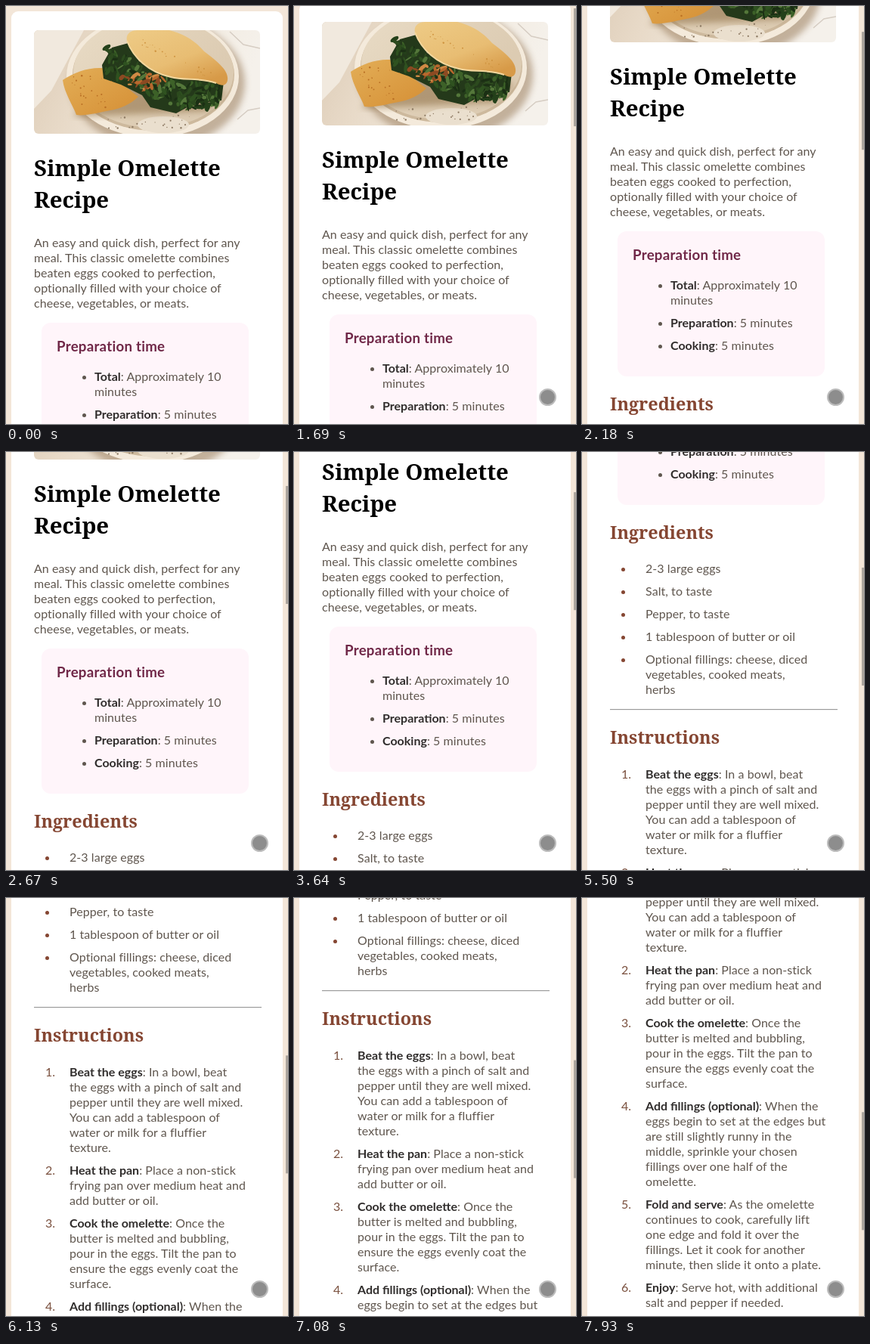
An HTML page for the animation above (7990 ms loop, 373 px wide and 553 px high).

```html
<!DOCTYPE html>
<html lang="en">
<head>
<meta charset="utf-8">
<title>Simple Omelette Recipe</title>
<style>
  html, body { margin: 0; width: 100%; height: 100%; overflow: hidden; background: #f3e6d8; }
  #stage { position: relative; width: 373px; height: 553px; overflow: hidden; }
  #page { position: absolute; left: 0; top: 0; width: 373px; height: 1956px; white-space: nowrap;
    font: 16px/20px Lato, sans-serif; letter-spacing: .06px; color: #5f564e; }
  #page > * { position: absolute; margin: 0; padding: 0; }
  .card { left: 7px; top: 7px; width: 359px; height: 1930px; border-radius: 9px; background: #fff; }
  .photo { left: 37px; top: 32px; border-radius: 6px; }
  h1, h2 { left: 37px; font-family: "Noto Serif", serif; font-weight: 700; letter-spacing: 0; }
  h1 { top: 193px; font-size: 29.4px; line-height: 42px; color: #000; }
  h2 { font-size: 23.4px; line-height: 30px; color: #854632; }
  h3 { left: 67px; top: 438px; font-size: 18.72px; line-height: 24px; letter-spacing: .25px; color: #702848; }
  strong { color: #302d2c; letter-spacing: 0; }
  .intro { left: 37px; top: 303px; }
  .panel { left: 47px; top: 419px; width: 274px; height: 192px; border-radius: 12px; background: #fff5fa; }
  ul, ol { list-style: none; }
  li { position: relative; margin-bottom: 10px; }
  li::before { content: ""; position: absolute; left: -32px; color: #7a503e; }
  ul li::before { top: 9px; width: 5px; height: 5px; border-radius: 50%; background: #854632; }
  .times li::before { left: -16px; background: #5f564e; }
  .times { left: 117px; top: 480px; }
  .items { left: 84px; top: 685px; }
  .steps { left: 84px; top: 957px; counter-reset: step; }
  .steps li::before { counter-increment: step; content: counter(step) "."; }
  .rule { left: 37px; top: 881px; width: 301px; height: 1px; background: #9a9a9a; border-bottom: 1px solid #eee; }
  #thumb { position: absolute; left: 370px; top: 0; width: 3px; height: 156px; background: #aca59e; }
  #touch { position: absolute; left: 324px; top: -12px; width: 19px; height: 19px; border-radius: 50%;
    background: #8d8d8d; border: 2px solid #bcbcbc; }
</style>
</head>
<body>
<div id="stage">
  <div id="page">
    <div class="card"></div>
    <svg class="photo" width="299" height="137" viewBox="37 32 299 137">
      <defs>
        <linearGradient id="marble" y2=".2"><stop offset="0" stop-color="#dccbb6"/><stop offset=".3" stop-color="#e8dac8"/><stop offset=".8" stop-color="#f3ede4"/><stop offset="1" stop-color="#f5f1eb"/></linearGradient>
        <linearGradient id="dish" x2=".8" y2=".6"><stop offset="0" stop-color="#e9dcc6"/><stop offset="1" stop-color="#dccbb2"/></linearGradient>
        <linearGradient id="egg" x2=".7" y2="1"><stop offset="0" stop-color="#eecb86"/><stop offset=".6" stop-color="#e8bd73"/><stop offset="1" stop-color="#d79a48"/></linearGradient>
        <linearGradient id="lobe" y2="1"><stop offset="0" stop-color="#e3ae57"/><stop offset="1" stop-color="#d58f35"/></linearGradient>
        <filter id="soft"><feGaussianBlur stdDeviation="4"/></filter>
      </defs>
      <path fill="url(#marble)" d="M37 32h299v137H37z"/>
      <path fill="#f1e9de" d="M37 32h66L60 112 37 136z"/>
      <path fill="none" stroke="#d6cdc3" stroke-width="1.5" d="M296 34l18 17 22 5M306 150l14-12 16-3"/>
      <ellipse cx="200" cy="102" rx="116" ry="86" fill="#a08566" opacity=".6" filter="url(#soft)"/>
      <ellipse cx="194" cy="93" rx="114" ry="81" fill="#f4eadb"/>
      <ellipse cx="195" cy="91" rx="107" ry="74" fill="#cdb99d"/>
      <ellipse cx="195" cy="88" rx="106" ry="73" fill="url(#dish)"/>
      <ellipse cx="208" cy="157" rx="34" ry="11" fill="#eadfce"/>
      <path fill="#8a6a40" opacity=".55" filter="url(#soft)" d="M88 146l45-1 60-3 72-3 27-24-140-20z"/>
      <path fill="url(#lobe)" d="M75 98c14-10 34-17 52-16l48 38c-10 10-24 16-37 18-16 3-34 8-45 6-4-12-16-29-18-46z"/>
      <path fill="#24391a" d="M127 78l13-23 22-6 14 24 42 20 70 7-3 25-36 4-24 13-34-8-11-16-28-14-23-8z"/>
      <g id="leaves"></g>
      <path fill="url(#egg)" d="M160 46c-2-8 4-14 14-14h42c20 5 34 14 46 28 17 13 33 25 31 38-1 7-7 9-15 4-22-8-42-3-60-8-29-6-50-26-58-48z"/>
      <path fill="none" stroke="#f3d79e" stroke-width="2" d="M160 46c8 22 29 42 58 48 18 5 38 0 60 8"/>
      <g id="specks"></g>
    </svg>
    <h1>Simple Omelette<br>Recipe</h1>
    <p class="intro">An easy and quick dish, perfect for any<br>meal. This classic omelette combines<br>beaten eggs cooked to perfection,<br>optionally filled with your choice of<br>cheese, vegetables, or meats.</p>
    <div class="panel"></div>
    <h3>Preparation time</h3>
    <ul class="times">
      <li><strong>Total</strong>: Approximately 10<br>minutes</li>
      <li><strong>Preparation</strong>: 5 minutes</li>
      <li><strong>Cooking</strong>: 5 minutes</li>
    </ul>
    <h2 style="top:632px">Ingredients</h2>
    <ul class="items">
      <li>2-3 large eggs</li>
      <li>Salt, to taste</li>
      <li>Pepper, to taste</li>
      <li>1 tablespoon of butter or oil</li>
      <li>Optional fillings: cheese, diced<br>vegetables, cooked meats,<br>herbs</li>
    </ul>
    <div class="rule"></div>
    <h2 style="top:903px">Instructions</h2>
    <ol class="steps">
      <li><strong>Beat the eggs</strong>: In a bowl, beat<br>the eggs with a pinch of salt and<br>pepper until they are well mixed.<br>You can add a tablespoon of<br>water or milk for a fluffier<br>texture.</li>
      <li><strong>Heat the pan</strong>: Place a non-stick<br>frying pan over medium heat and<br>add butter or oil.</li>
      <li><strong>Cook the omelette</strong>: Once the<br>butter is melted and bubbling,<br>pour in the eggs. Tilt the pan to<br>ensure the eggs evenly coat the<br>surface.</li>
      <li><strong>Add fillings (optional)</strong>: When the<br>eggs begin to set at the edges but<br>are still slightly runny in the<br>middle, sprinkle your chosen<br>fillings over one half of the<br>omelette.</li>
      <li><strong>Fold and serve</strong>: As the omelette<br>continues to cook, carefully lift<br>one edge and fold it over the<br>fillings. Let it cook for another<br>minute, then slide it onto a plate.</li>
      <li><strong>Enjoy</strong>: Serve hot, with additional<br>salt and pepper if needed.</li>
    </ol>
  </div>
  <div id="thumb"></div>
  <div id="touch"></div>
</div>
<script>
const LOOP = 7990, TICK = 69;
const $ = id => document.getElementById(id);

// Each swipe: first moving tick, scroll range, how far into the easing it begins, easing length.
const swipes = [
  { start: 1690, from: 0, to: 163, lead: 223, span: 1486 },
  { start: 3440, from: 163, to: 454, lead: 35, span: 1443 },
  { start: 5160, from: 454, to: 755, lead: 46, span: 1443 },
  { start: 7010, from: 755, to: 1026, lead: 42, span: 1443 }
];

let seed = 7;
const random = () => (seed = seed * 16807 % 2147483647) / 2147483647;
const pick = list => list[Math.floor(random() * list.length)];

function drawFilling() {
  const greens = ['#2c4a1e', '#3d6128', '#1b2f14', '#54773a', '#2f5220', '#24401a'];
  const browns = ['#b9682d', '#d08a45', '#8c4a22'];
  let leaves = '', specks = '';
  for (let i = 0; i < 200; i++) {
    const u = random(), spread = random() - .5;
    const x = 132 + 150 * u, y = 70 + 50 * Math.sin(u * 1.8) + spread * 34;
    const brown = Math.hypot((x - 182) / 32, (y - 99) / 11) < 1 && random() < .7;
    leaves += `<ellipse rx="${2 + random() * 6}" ry="${1 + random() * 2}" fill="${pick(brown ? browns : greens)}"
      transform="translate(${x} ${y}) rotate(${random() * 180})"/>`;
  }
  for (let i = 0; i < 75; i++) {
    const low = i % 3 === 0, flap = i % 3 === 1, u = random();
    const x = low ? 135 + random() * 110 : flap ? 178 + u * 95 : 86 + u * 62;
    const y = low ? 142 + random() * 20 : flap ? 42 + u * 46 + random() * 10 : 92 + random() * 42;
    specks += `<circle cx="${x}" cy="${y}" r="${.4 + random() * .8}" fill="${low ? '#8d7a63' : flap ? '#cf9440' : '#b96f24'}"/>`;
  }
  $('leaves').innerHTML = leaves;
  $('specks').innerHTML = specks;
}

// cubic-bezier(.4, 0, .2, 1)
function ease(x) {
  if (x >= 1) return 1;
  let low = 0, high = 1;
  for (let i = 0; i < 24; i++) {
    const s = (low + high) / 2, r = 1 - s;
    if (1.2 * s * r * r + .6 * s * s * r + s * s * s < x) low = s; else high = s;
  }
  return low * low * (3 - 2 * low);
}

const ticksSince = (start, t) => Math.floor((t - start + 8) / TICK);

function scrollAt(t) {
  const swipe = swipes.filter(s => t >= s.start).pop();
  if (!swipe) return 0;
  const elapsed = swipe.lead + ticksSince(swipe.start, t) * TICK;
  return Math.round(swipe.from + (swipe.to - swipe.from) * ease(elapsed / swipe.span));
}

function draw() {
  const t = performance.now() % LOOP;
  const scroll = scrollAt(t);
  $('page').style.transform = `translateY(${-scroll}px)`;

  const fading = swipes.some(s => t < s.start && s.start - t <= 140);
  $('thumb').style.transform = `translateY(${scroll * 553 / 1956}px)`;
  $('thumb').style.opacity = t < swipes[0].start ? 0 : fading ? .75 : 1;

  const arrival = t < 760 ? 0 : Math.min(1, (ticksSince(760, t) + 1) / 5);
  $('touch').style.transform = `translateY(${518 + 50 * (1 - arrival) ** 2}px)`;
  requestAnimationFrame(draw);
}

drawFilling();
draw();
</script>
</body>
</html>
```
